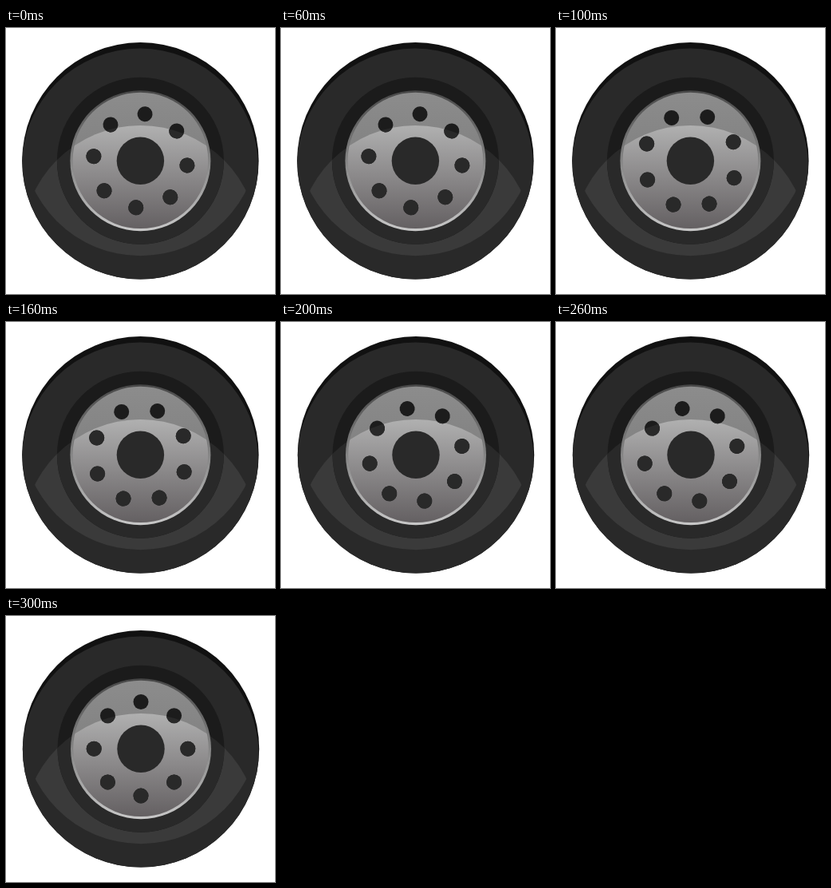
An HTML page for the animation above (400 ms loop, 337 px wide and 333 px high).

```html
<!DOCTYPE html>
<html lang="en">
<head>
<meta charset="utf-8">
<title>Spinning wheel</title>
<style>
html, body { margin: 0; width: 100%; height: 100%; overflow: hidden; background: #fff; }
svg { display: block; width: 100%; height: 100%; }
</style>
</head>
<body>
<svg viewBox="0 0 337 333">
  <defs>
    <linearGradient id="rim" x1="0" y1="0" x2="0" y2="1">
      <stop offset="0" stop-color="#484848"/>
      <stop offset=".5" stop-color="#858585"/>
      <stop offset="1" stop-color="#c8c8c8"/>
    </linearGradient>
    <linearGradient id="plate" x1="0" y1="0" x2="0" y2="1">
      <stop offset="0" stop-color="#8c8c8c"/>
      <stop offset="1" stop-color="#757575"/>
    </linearGradient>
    <linearGradient id="glow" gradientUnits="userSpaceOnUse" x1="0" y1="-44" x2="0" y2="85">
      <stop offset="0" stop-color="#b0b0b0"/>
      <stop offset="1" stop-color="#646062"/>
    </linearGradient>
    <clipPath id="tyreClip"><circle r="148.2"/></clipPath>
    <clipPath id="plateClip"><circle r="84.8"/></clipPath>
    <clipPath id="shineClip"><ellipse cy="103.7" rx="148" ry="148"/></clipPath>
  </defs>
  <g id="wheel">
    <circle r="148.2" fill="#111"/>
    <g clip-path="url(#tyreClip)">
      <circle cx="-.6" cy="7.5" r="148.2" fill="#292929"/>
      <g clip-path="url(#shineClip)">
        <ellipse cy="-29.3" rx="148.2" ry="148.2" fill="#3a3a3a"/>
      </g>
    </g>
    <circle r="104.5" fill="#1b1b1b"/>
    <circle r="104.5" fill="#292929" clip-path="url(#shineClip)"/>
    <circle r="88" fill="url(#rim)"/>
    <circle cy="-.8" r="84.8" fill="url(#plate)"/>
    <g clip-path="url(#plateClip)">
      <circle cy="103.7" r="148" fill="url(#glow)"/>
    </g>
    <circle r="29.7" fill="#292929"/>
    <g class="bolts" fill="#1c1c1c"></g>
    <g clip-path="url(#shineClip)"><g class="bolts" fill="#292929"></g></g>
  </g>
</svg>
<script>
const PERIOD = 400, STEP = 100, BOLTS = 8;
const angles = [5.5, 21.3, 34.4, 45];
const wheel = document.getElementById('wheel');
const rings = [...document.querySelectorAll('.bolts')];

for (const ring of rings) {
  for (let i = 0; i < BOLTS; i++) {
    const bolt = document.createElementNS('http://www.w3.org/2000/svg', 'circle');
    const a = i * 2 * Math.PI / BOLTS;
    bolt.setAttribute('cx', 58.8 * Math.sin(a));
    bolt.setAttribute('cy', -58.8 * Math.cos(a));
    bolt.setAttribute('r', 9.5);
    ring.append(bolt);
  }
}

function draw(time) {
  const pose = Math.floor(time % PERIOD / STEP);
  wheel.setAttribute('transform', `translate(${pose < 2 ? 168.4 : 169} 166.3)`);
  for (const ring of rings) ring.setAttribute('transform', `rotate(${angles[pose]})`);
}

function tick() {
  draw(performance.now());
  requestAnimationFrame(tick);
}
tick();
</script>
</body>
</html>
```
